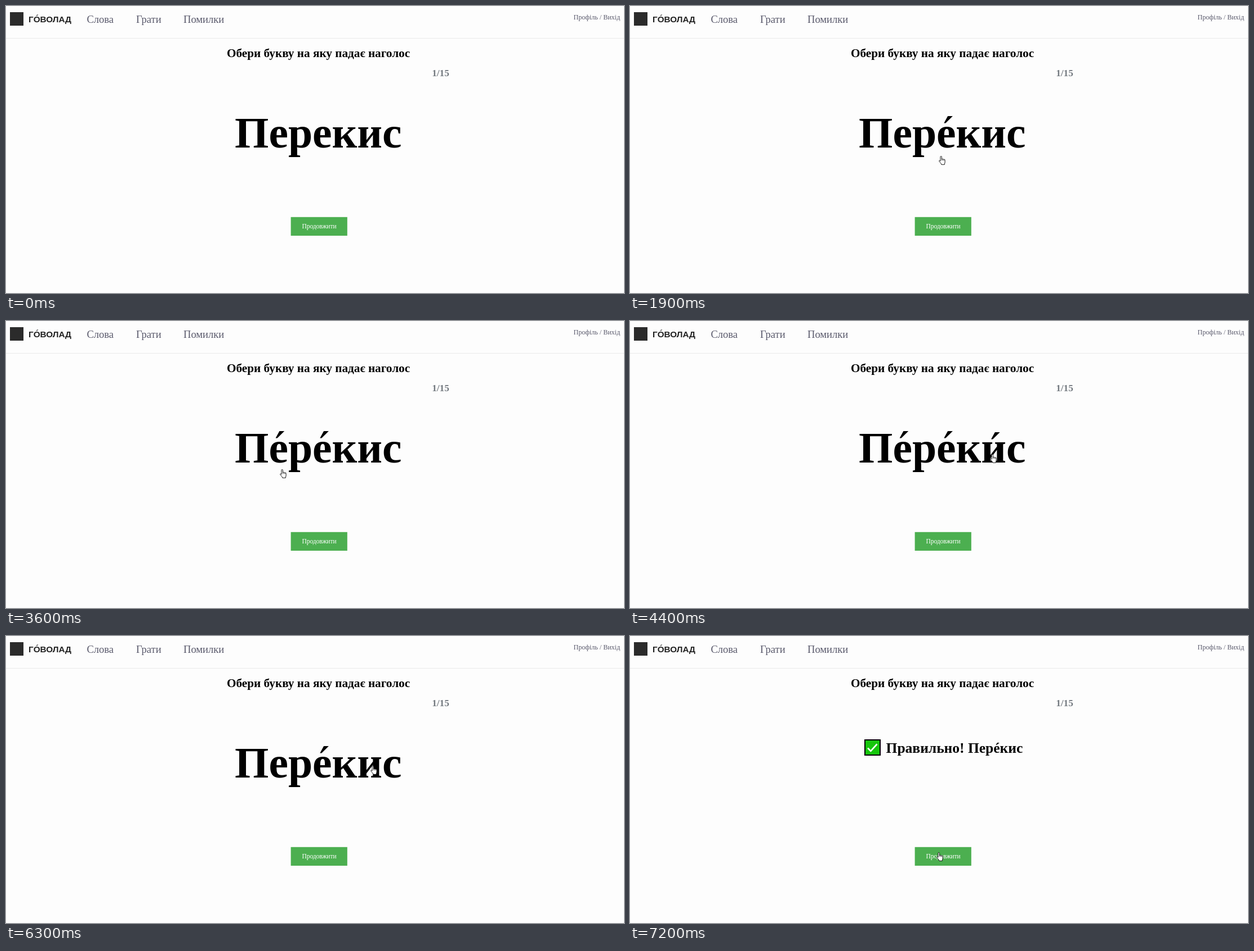
Recreate the animation shown at these times as an HTML page. Size 1097 px wide and 511 px high, loop 8 s.

```html
<!DOCTYPE html>
<html lang="uk">
<head>
<meta charset="utf-8">
<title>Гра</title>
<style>
  html, body { margin: 0; width: 100%; height: 100%; overflow: hidden; background: #fdfdfd; }
  svg { display: block; font-family: "Liberation Serif", "Times New Roman", serif; }
  .brand { font: bold 15.3px "Liberation Sans", Arial, sans-serif; fill: #222; }
  .nav { font-size: 18.57px; fill: #5a5a6c; }
  .account { font-size: 12px; fill: #5a5a6c; text-anchor: end; }
  .bold { font-weight: bold; }
  .title { font-size: 21.22px; text-anchor: middle; }
  .count { font-size: 17.14px; fill: #747a80; }
  .word { font-size: 77.6px; }
  .verdict { font-size: 25.5px; }
  .button { font-size: 11.43px; fill: #fff; text-anchor: middle; }
</style>
</head>
<body>
<svg width="1097" height="511" viewBox="0 0 1097 511">
  <defs>
    <path id="acute" d="M0 12.5L6.8 0H15.6L3 12.5Z"/>
  </defs>
  <rect x="7" y="11" width="24" height="24" fill="#2b2b2b"/>
  <text class="brand" x="40" y="29">ГÓВОЛАД</text>
  <g class="nav">
    <text x="143.4" y="30">Слова</text>
    <text x="231" y="30">Грати</text>
    <text x="315" y="30">Помилки</text>
  </g>
  <text class="account" x="1090" y="24">Профіль / Вихід</text>
  <rect y="57" width="1097" height="1" fill="#e9e9e9"/>
  <text class="bold title" x="554.5" y="91">Обери букву на яку падає наголос</text>
  <text class="bold count" x="756.3" y="125">1/15</text>

  <g id="question">
    <text class="bold word" x="406.1" y="252">Перекис</text>
    <use id="accent1" href="#acute" x="478.6" y="196"/>
    <use id="accent2" href="#acute" x="557.3" y="196"/>
    <use id="accent3" href="#acute" x="641" y="198"/>
  </g>

  <g id="answer">
    <rect x="417" y="185" width="27" height="27" fill="#16c60c" stroke="#000" stroke-width="2"/>
    <path d="M422 199.5L427.3 204.8L438.5 192.5" fill="none" stroke="#fff" stroke-width="2.6"/>
    <text class="bold verdict" x="454.6" y="208">Правильно! Перéкис</text>
  </g>

  <rect x="505.6" y="375.8" width="100.2" height="33.2" fill="#4caf50"/>
  <text class="button" x="556" y="396.3">Продовжити</text>

  <g id="cursor" fill="#fff" stroke="#000" stroke-linejoin="round">
    <path id="arrow" stroke-width=".7" d="M.3 .4V11.3L2.7 9.1L4.3 12.7L5.8 12L4.3 8.5H7.7Z"/>
    <g id="hand" stroke-width=".9" transform="translate(-4.2)">
      <path d="M3.2 9.2V1.7a1.2 1.2 0 0 1 2.4 0V6a1.1 1.1 0 0 1 2.1 .2a1 1 0 0 1 1.9 .4a.9 .9 0 0 1 1.7 .5V11c0 1.5-.8 2.3-.8 4.3H5c-.3-1.8-2-3.4-4-5.9c-.6-1 .8-1.9 1.6-1Z"/>
      <path fill="none" stroke-width=".7" d="M5.6 6v2.3M7.7 6.4v1.9M9.6 6.8v1.5"/>
    </g>
  </g>
</svg>
<script>
const LOOP = 8000, STEP = 100;

// Each move bends past "via" and starts where the one before ended.
const entry = [9, 25];
const moves = [
  { from: 200, until: 600, via: [400, 190], to: [566, 274] },
  { from: 600, until: 1000, via: [581, 249], to: [568, 235] },
  { from: 1700, until: 1900, via: [562, 250], to: [552, 267] },
  { from: 2000, until: 2500, via: [548, 290], to: [518, 365] },
  { from: 2500, until: 3100, via: [450, 250], to: [477, 231] },
  { from: 3500, until: 4100, via: [481, 315], to: [643, 237] },
  { from: 4600, until: 5000, via: [580, 320], to: [486, 250] },
  { from: 5100, until: 5300, via: [487, 243], to: [489, 235] },
  { from: 5600, until: 6200, via: [560, 355], to: [651, 231] },
  { from: 6300, until: 6400, to: [639, 261] },
  { from: 6400, until: 6500, to: [624, 325] },
  { from: 6600, until: 6900, via: [590, 375], to: [548, 385] },
];

// Visible spans in ms.
const spans = {
  cursor: [200, LOOP],
  accent1: [3300, 5600],
  accent2: [1700, LOOP],
  accent3: [4400, 6300],
  question: [0, 7200],
  answer: [7200, LOOP],
};

const el = id => document.getElementById(id);
const show = (id, on) => { el(id).style.display = on ? '' : 'none'; };
const inside = (x, y, left, top, right, bottom) =>
  x >= left && x <= right && y >= top && y <= bottom;
const easeOut = k => Math.sin(Math.min(k, 1) * Math.PI / 2);
const bend = (a, b, c, k) => (1 - k) ** 2 * a + 2 * k * (1 - k) * b + k * k * c;

function pointerAt(time) {
  const t = Math.floor(time / STEP) * STEP;
  const i = moves.findLastIndex(move => move.from <= t);
  if (i < 0) return entry;
  const start = i ? moves[i - 1].to : entry;
  const { from, until, to, via = to } = moves[i];
  const k = easeOut((t - from) / (until - from));
  return start.map((a, axis) => Math.round(bend(a, via[axis], to[axis], k)));
}

function draw(now) {
  const t = now % LOOP;
  for (const [id, [from, until]] of Object.entries(spans)) show(id, t >= from && t < until);
  const [x, y] = pointerAt(t);
  const clickable = inside(x, y, 406, 182, 703, 269) || inside(x, y, 506, 376, 606, 409);
  show('hand', clickable);
  show('arrow', !clickable);
  el('cursor').setAttribute('transform', `translate(${x} ${y})`);
}

const begin = performance.now();
function tick() {
  draw(performance.now() - begin);
  requestAnimationFrame(tick);
}
tick();
</script>
</body>
</html>
```
